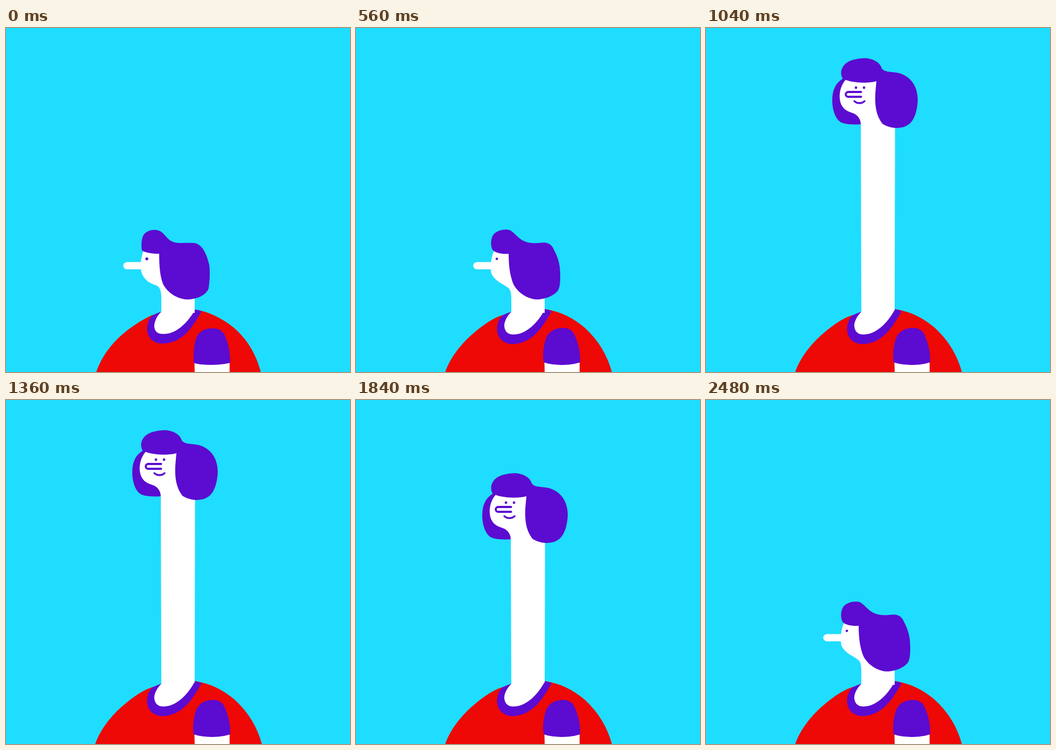
Animation of 640x640 px, one loop 2560 ms. Source, as an HTML page with a canvas:

```html
<!DOCTYPE html>
<html>
<head>
<meta charset="utf-8">
<style>
  html, body { margin: 0; height: 100%; overflow: hidden; background: #1fddff; }
  canvas { display: block; }
</style>
</head>
<body>
<canvas id="stage" width="640" height="640"></canvas>
<script>
const ctx = document.getElementById('stage').getContext('2d');
const SKY = '#1fddff', PURPLE = '#5c0bd1', RED = '#ee0806', WHITE = '#fff';
const STEP = 80, STEPS = 32, TRAVEL = 320;

// Two hand-drawn versions of each shape alternate to make the line boil.
const drawings = [
  {
    body: 'M168 640C180 605 205 576 236 555C247 547 259 540 272 534L352 524C376 527 402 540 423 557C447 577 465 605 474 640Z',
    collar: 'M289 528C281 530 275 533 271 536C264 545 261 555 263 565C266 581 278 588 294 587C330 585 347 556 364 527Q357 524 351 524Z',
    throat: 'M289 528C279 537 275 550 276 557C278 568 286 570 297 569C318 568 340 546 351 525Z',
    sleeve: 'M349 623C349 605 349 588 355 574C362 562 374 558 387 559C398 559 404 565 408 574C414 588 417 605 417 623C400 627 368 629 349 623Z',
    face: 'M256 414C250 430 249 447 253 457C258 470 268 475 280 479C288 483 289 492 289 505V530H351V495L300 410Z',
    hair: 'M253 414C251 404 252 392 256 385C264 374 281 373 290 380C298 387 302 396 314 399C325 401 340 399 350 400C366 402 374 423 378 440C380 455 379 470 377 484C373 497 355 505 336 505C318 504 300 492 292 476C286 460 285 440 285 420C272 420 260 418 253 414Z',
    eye: 2.7, headScale: 1.01
  },
  {
    body: 'M166 640C179 604 207 575 236 554C248 545 260 538 273 534L352 523C380 527 405 540 426 558C452 582 468 610 476 640Z',
    collar: 'M289 528C281 530 275 533 271 536C264 545 261 555 263 566C266 581 278 589 294 588C330 585 347 556 364 527Q357 524 351 523Z',
    throat: 'M289 528C280 537 275 548 276 556C278 568 286 571 296 570C318 569 340 546 351 524Z',
    sleeve: 'M349 622C347 605 349 590 354 576C360 563 372 558 385 558C397 558 404 564 407 572C414 588 418 605 417 622C400 628 370 629 349 622Z',
    face: 'M257 414C250 430 249 450 253 459C260 472 274 476 284 484C288 488 289 496 289 505V530H351V495L300 410Z',
    hair: 'M255 414C249 406 251 390 256 384C264 375 280 373 288 377C297 383 303 393 314 397C325 402 338 400 350 399C362 400 366 407 369 414C378 431 380 445 380 462C380 475 379 482 376 488C369 498 352 505 336 505C318 504 301 492 293 477C286 460 284 440 284 420C272 421 262 419 255 414Z',
    eye: 2.3, headScale: 1
  }
];

const front = {
  backHair: 'M262 91C245 97 236 110 235 130C234 150 240 170 252 176C263 180 276 180 288 179V100Z',
  face: 'M260 96C248 110 246 130 252 143C258 155 268 156 277 160C285 165 288 172 288 180L351 184L330 96Z',
  sideHair: 'M317 99L327 75C330 80 337 81 345 82C376 83 394 104 394 134C393 156 387 170 380 177C372 184 364 186 352 186C342 185 334 182 328 178C316 162 314 143 315 122Z',
  fringe: 'M254 94C249 84 251 74 260 66C270 58 283 57 295 56C311 57 323 63 327 75L324 96Q319 99 317 99C300 104 268 102 254 94Z',
  nose: 'M288.5 119H264.5A4.5 4.5 0 0 0 264.5 128H288.5',
  mouth: 'M276 136C281 141 290 141 295 136'
};

function fill(path, color) {
  ctx.fillStyle = color;
  ctx.fill(new Path2D(path));
}

function line(path, color, width) {
  ctx.strokeStyle = color;
  ctx.lineWidth = width;
  ctx.lineCap = 'round';
  ctx.stroke(new Path2D(path));
}

function dot(x, y, r) {
  ctx.fillStyle = PURPLE;
  ctx.beginPath();
  ctx.arc(x, y, r, 0, 2 * Math.PI);
  ctx.fill();
}

function drawBody(d) {
  fill(d.body, RED);
  fill(d.collar, PURPLE);
  fill(d.throat, WHITE);
  fill('M350.5 618H416V640H351Z', WHITE);
  fill(d.sleeve, PURPLE);
}

function drawProfile(d) {
  fill(d.face, WHITE);
  line('M225 442.3H256', WHITE, 13.6);
  fill(d.hair, PURPLE);
  dot(262, 429.5, d.eye);
}

function drawFront(d, drop) {
  fill(`M288 ${172 + drop}H351.7L351 526L289 529Z`, WHITE);
  ctx.save();
  ctx.translate(315, 121 + drop);
  ctx.scale(d.headScale, d.headScale);
  ctx.translate(-315, -121);
  fill(front.backHair, PURPLE);
  fill(front.face, WHITE);
  fill(front.sideHair, PURPLE);
  fill(front.fringe, PURPLE);
  dot(279, 111, 2.4);
  dot(294, 111, 2.4);
  line(front.nose, PURPLE, 3.8);
  line(front.mouth, PURPLE, 3.4);
  ctx.restore();
}

// Sine ease from 0 to 1 over six steps.
function ease(step, start) {
  const p = Math.min(1, Math.max(0, (step - start) / 6));
  return (1 - Math.cos(Math.PI * p)) / 2;
}

function draw() {
  const step = Math.floor(performance.now() / STEP) % STEPS;
  const d = drawings[step % 2];
  const rise = ease(step, 7) - ease(step, 21);
  ctx.fillStyle = SKY;
  ctx.fillRect(0, 0, 640, 640);
  drawBody(d);
  if (rise > 0.001) drawFront(d, TRAVEL * (1 - rise));
  else drawProfile(d);
  requestAnimationFrame(draw);
}
draw();
</script>
</body>
</html>
```
